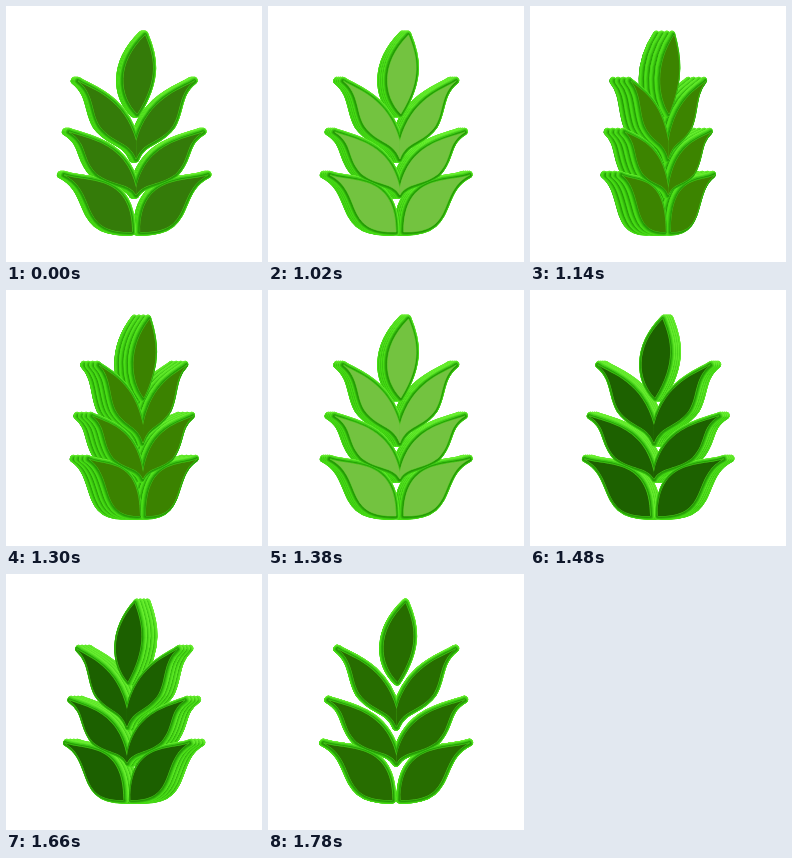
Animation, 256 px wide and 256 px high, one loop 1.8 s. Source, as an HTML page with a canvas:

```html
<!DOCTYPE html>
<html>
<head>
<meta charset="utf-8">
<style>
html, body { margin: 0; width: 100%; height: 100%; overflow: hidden; background: #fff; }
canvas { display: block; }
</style>
</head>
<body>
<canvas id="stage" width="256" height="256"></canvas>
<script>
const ctx = document.getElementById('stage').getContext('2d');
const DEPTH = 27, LAYERS = 48, BEADS = 4, BULGE = 3.2;
const LOOP = 1800, HOLD = 1020, STEP = 20;

// Face outlines, with x measured from the rotation axis
const half = [
  'M-59 75C-44 84 -12 92 0 135V153C-8 134 -24 138 -37 120C-46 106 -42 88 -59 75Z',
  'M-68 126C-50 133 -10 136 0 182V189C-8 176 -24 180 -40 168C-56 152 -48 138 -68 126Z',
  'M-73 169C-52 177 -4 166 -4 226C-60 228 -38 186 -73 169Z'
].map(d => new Path2D(d));
const mirror = path => {
  const flipped = new Path2D();
  flipped.addPath(path, new DOMMatrix([-1, 0, 0, 1, 0, 0]));
  return flipped;
};
const leaves = [
  new Path2D('M9 29C18 50 24 72 1 108C-17 90 -21 58 9 29Z'),
  ...half, ...half.map(mirror)
];

const mix = (a, b, k) => `rgb(${a.map((v, i) => Math.round(v + (b[i] - v) * k))})`;

function faceColor(deg) {
  const k = Math.min(1, Math.max(0, (deg + 20) / 65));
  const shine = Math.exp(-(((deg - 20) / 5) ** 2) / 2);
  const base = [28, 96, 0], lit = [60, 132, 0], glow = [86, 98, 80];
  return `rgb(${base.map((v, i) => Math.round(v + (lit[i] - v) * k + glow[i] * shine))})`;
}

function slice(color, width) {
  ctx.fillStyle = ctx.strokeStyle = color;
  ctx.lineWidth = width;
  for (const leaf of leaves) {
    ctx.fill(leaf);
    ctx.stroke(leaf);
  }
}

function draw(step) {
  const deg = 9.5 + 46 * Math.sin(step * Math.PI / 20);
  const angle = deg * Math.PI / 180;
  const c = Math.cos(angle), s = Math.sin(angle);
  const place = (x, y) => ctx.setTransform(c, 0, 0, 1, 128 + x, y);

  ctx.setTransform(1, 0, 0, 1, 0, 0);
  ctx.clearRect(0, 0, 256, 256);
  ctx.lineJoin = 'round';

  // Beaded walls, back to front; the lit copy peeps out on the upper right
  for (let i = 0; i <= LAYERS; i++) {
    const u = i / LAYERS;
    const bead = Math.abs(Math.sin(u * Math.PI * BEADS));
    const width = 0.4 + 2 * BULGE * Math.sqrt(bead);
    const x = DEPTH * (u - 0.5) * s;
    place(x + 0.4, -0.8);
    slice(mix([50, 195, 15], [108, 240, 50], bead), width);
    place(x, 0);
    slice(mix([24, 130, 0], [72, 222, 22], bead), width);
  }

  // Front faces
  place(DEPTH / 2 * s, 0);
  slice('#4cc81a', 1);
  ctx.fillStyle = faceColor(deg);
  leaves.forEach(leaf => ctx.fill(leaf));
}

function frame(now) {
  const t = now % LOOP;
  draw(t < HOLD ? 0 : 1 + Math.floor((t - HOLD) / STEP));
  requestAnimationFrame(frame);
}
draw(0);
requestAnimationFrame(frame);
</script>
</body>
</html>
```
